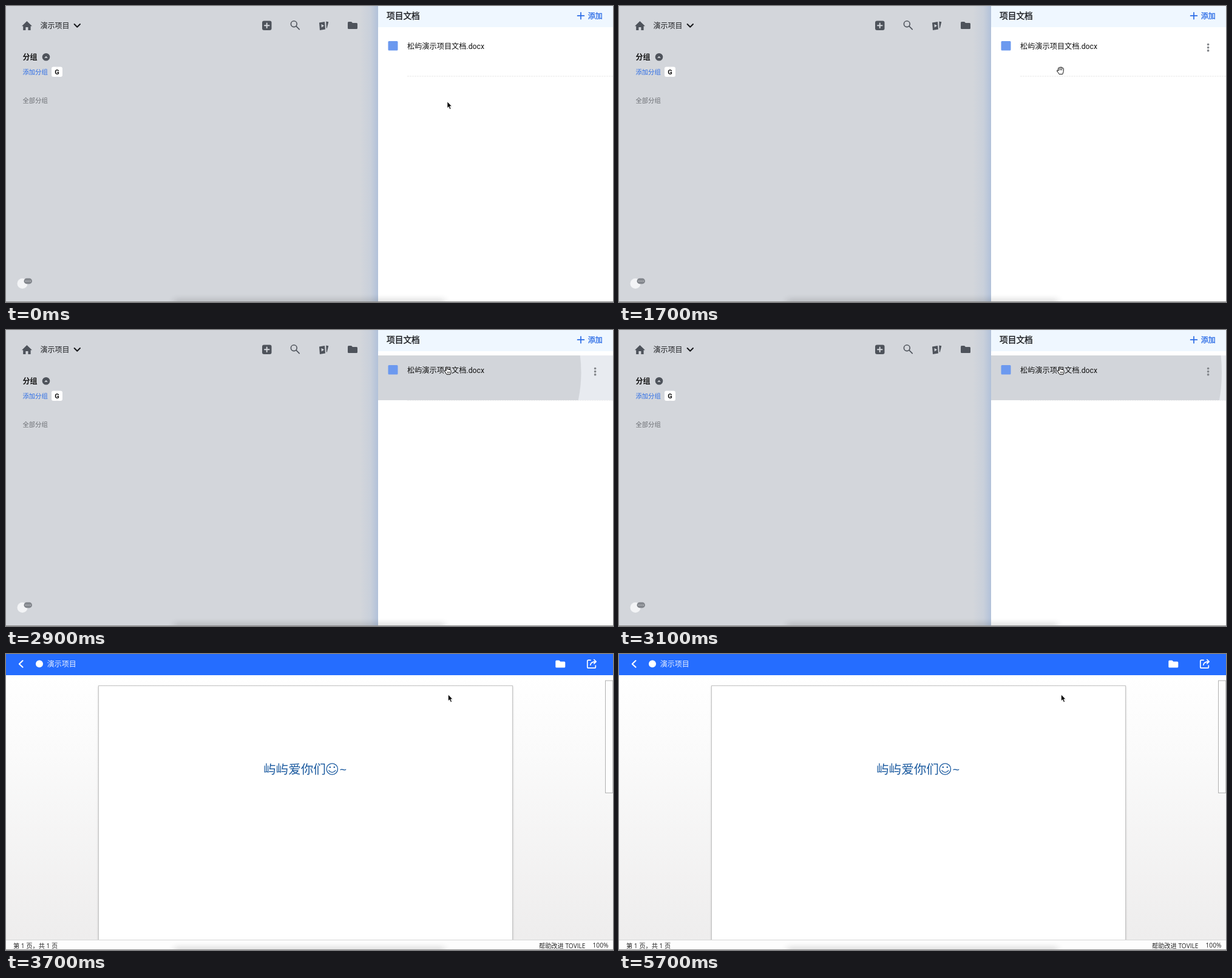
Recreate the animation shown at these times as an HTML page. Size 1000 px wide and 489 px high, loop 6.7 s.

```html
<!DOCTYPE html>
<html lang="zh-CN">
<head>
<meta charset="utf-8">
<title>项目文档</title>
<style>
html, body { margin: 0; height: 100%; overflow: hidden; background: #fff; }
svg { display: block; width: 100vw; height: 100vh; }
text { font-family: Roboto, "Noto Sans CJK SC", "Noto Sans CJK", sans-serif; font-size: 12px; }
.doc text { font-family: "Open Sans", "Noto Sans CJK SC", "Noto Sans CJK", sans-serif; }
.medium { stroke-width: .35; }
.small { font-size: 10.3px; }
.doc .status { font-size: 10.2px; }
.line { fill: none; stroke-linecap: round; stroke-linejoin: round; }
</style>
</head>
<body>
<svg viewBox="0 0 1000 489">
  <defs>
    <linearGradient id="edge">
      <stop offset="0" stop-color="#a9bcd9" stop-opacity="0"/>
      <stop offset=".6" stop-color="#a9bcd9" stop-opacity=".25"/>
      <stop offset="1" stop-color="#a9bcd9" stop-opacity=".8"/>
    </linearGradient>
    <linearGradient id="desk" x2="0" y2="1">
      <stop offset="0" stop-color="#fff"/>
      <stop offset=".3" stop-color="#fafafa"/>
      <stop offset="1" stop-color="#eeeded"/>
    </linearGradient>
    <filter id="blur" x="-10%" y="-200%" width="120%" height="500%"><feGaussianBlur stdDeviation="6 4"/></filter>
    <filter id="soft" x="-5%" y="-5%" width="110%" height="110%"><feGaussianBlur stdDeviation="1.5"/></filter>
    <clipPath id="row"><rect x="613" y="42" width="387" height="74"/></clipPath>
    <path id="folder" d="M0 2 Q0 0 1.5 0 H6 L8 2 H14.5 Q16 2 16 3.5 V10.5 Q16 12 14.5 12 H1.5 Q0 12 0 10.5 Z"/>
  </defs>

  <g id="project">
    <rect width="613" height="489" fill="#d3d6db"/>
    <rect x="583" width="30" height="489" fill="url(#edge)"/>

    <g fill="#4e535b">
      <path d="M26 33.2 L34.4 25 L43 33.2 H40.6 V40 H36.4 V35 H32.4 V40 H28.2 V33.2 Z"/>
      <rect x="422" y="24.5" width="15.5" height="15.5" rx="3"/>
      <path d="M516 27.5 L525 26 L526 38.5 L517 40 Z M527.3 25.5 L531.3 26.2 L528.8 36.5 L527.8 36.5 Z"/>
      <use href="#folder" x="563" y="26"/>
      <circle cx="66" cy="84.3" r="6.3"/>
    </g>
    <path d="M519.5 30 L524 32.6 L519.8 35.5 Z M63.2 85.8 L66 82.8 L68.8 85.8 Z" fill="#d3d6db"/>
    <path class="line" d="M429.7 28.5 V36 M426 32.2 H433.5" stroke="#d3d6db" stroke-width="2"/>
    <g class="line" stroke="#4e535b" stroke-width="1.6">
      <circle cx="474.3" cy="29.7" r="4.9"/>
      <path d="M478 33.4 L483.2 38.6"/>
    </g>
    <path class="line" d="M112.6 30 L117.3 34.7 L122 30" stroke="#17191c" stroke-width="2"/>

    <text x="56.5" y="37" fill="#1c1e21">演示项目</text>
    <text x="27.5" y="88.7" fill="#111" font-weight="700">分组</text>
    <text class="small" x="27.5" y="112.8" fill="#2b6ce6">添加分组</text>
    <rect x="75" y="100.5" width="18" height="16.5" rx="3" fill="#fff"/>
    <text x="84" y="112.7" fill="#111" font-weight="700" style="font-size:11px" text-anchor="middle">G</text>
    <text class="small" x="27.5" y="159.6" fill="#6b6e73">全部分组</text>

    <circle cx="27" cy="458.5" r="8.5" fill="#f3f4f6"/>
    <rect x="29.5" y="449.8" width="13.5" height="9.4" rx="4.7" fill="#84888e"/>
    <path class="line" d="M33 454.5 h0 M36.3 454.5 h0 M39.6 454.5 h0" stroke="#e8e9eb" stroke-width="1.6"/>

    <rect x="613" width="387" height="489" fill="#fff"/>
    <rect x="613" width="387" height="35" fill="#eff7ff"/>
    <text class="medium" x="627" y="21.2" fill="#17191c" stroke="#17191c" style="font-size:13.7px">项目文档</text>
    <path class="line" d="M947 10.8 V21.6 M941.6 16.2 H952.4" stroke="#2b6ce6" stroke-width="1.7"/>
    <text class="medium" x="958.7" y="20.7" fill="#2b6ce6" stroke="#2b6ce6">添加</text>

    <path d="M661 116 H1000" stroke="#e8e8e8" stroke-dasharray="3 1"/>
    <rect id="hover" x="613" y="42" width="387" height="74" fill="#e8ebf0"/>
    <g clip-path="url(#row)"><circle id="ripple" cx="727" cy="70" fill="#d2d5da"/></g>
    <rect x="629.5" y="58" width="16" height="15.5" rx="1.5" fill="#6c99ef"/>
    <text x="661" y="70.5" fill="#111" style="font-size:12.2px">松屿演示项目文档.docx</text>
    <path id="menu" class="line" d="M970.6 63.5 h0 M970.6 68.6 h0 M970.6 73.7 h0" stroke="#85888c" stroke-width="3.7"/>
  </g>

  <g id="paper" class="doc">
    <rect y="35" width="1000" height="437" fill="url(#desk)"/>
    <rect x="152" y="53" width="683" height="440" fill="#000" opacity=".22" filter="url(#soft)"/>
    <rect x="152.5" y="52.5" width="682" height="440" fill="#fff" stroke="#c4c4c4"/>
    <rect x="987.5" y="44" width="12.2" height="185.5" fill="#fdfdfd" stroke="#b0b0b0"/>

    <rect width="1000" height="35" fill="#256dff"/>
    <path class="line" d="M27.5 11 L21.8 16.4 L27.5 21.8" stroke="#fff" stroke-width="2.1"/>
    <circle cx="55" cy="16.3" r="6" fill="#fff"/>
    <text x="67.8" y="20.6" fill="#eaf1ff">演示项目</text>
    <use href="#folder" x="905.3" y="10.5" fill="#fff"/>
    <g class="line" stroke="#fff" stroke-width="1.7">
      <path d="M963 10.2 H959.5 Q957.8 10.2 957.8 12 V21.5 Q957.8 23.2 959.5 23.2 H969.6 Q971.3 23.2 971.3 21.5 V19"/>
      <path d="M962.8 18.2 Q963.2 13 971.5 12.6 M968.8 9.4 L972.2 12.6 L968.8 15.8"/>
    </g>

    <g fill="#1b5a9f">
      <text x="424" y="198" style="font-size:20.6px">屿屿爱你们</text>
      <text x="549.5" y="198" style="font-size:20.6px">~</text>
      <circle cx="533.8" cy="187" r="1.3"/>
      <circle cx="540.8" cy="187" r="1.3"/>
    </g>
    <g class="line" stroke="#1b5a9f" stroke-width="1.3">
      <circle cx="537.3" cy="190" r="9.2"/>
      <path d="M531.8 192.3 Q537.3 199 542.8 192.3"/>
    </g>

    <rect y="472" width="1000" height="17" fill="#fdfdfd"/>
    <path d="M0 472.5 H1000" stroke="#d6d6d6"/>
    <g fill="#222">
      <text class="status" x="12" y="486.3">第 1 页，共 1 页</text>
      <text class="status" x="878" y="486.3">帮助改进 TOVILE</text>
      <text class="status" x="966.5" y="485.3">100%</text>
    </g>
  </g>

  <rect x="277" y="483" width="446" height="16" fill="#000" opacity=".11" filter="url(#blur)"/>
  <path d="M0 488.5 H1000" stroke="#8c8c8c"/>

  <path id="arrow" d="M0 0 V10.6 L2.4 8.4 L4.1 12.5 L6 11.7 L4.3 7.7 H7.4 Z" fill="#000" stroke="#fff" stroke-width=".7"/>
  <g id="palm" class="line" stroke="#111">
    <path d="M-5.7 1 Q-6.3 -1.2 -4.4 -.9 L-3.4 .3 L-4 -3.6 Q-3.5 -5.4 -2.1 -4.4 Q-1.6 -6.6 .2 -5.4 Q2 -6.6 2.6 -4.5 Q4.7 -5 4.9 -2.8 Q5.2 2 3.3 6 H-2.4 Q-3.2 4 -5.7 1 Z" fill="#fff"/>
    <path d="M-2 -4 L-1.4 -.8 M.3 -5 V-1 M2.5 -4.2 L2 -.8" stroke-width=".8"/>
  </g>
  <g id="finger" class="line" stroke="#111">
    <path d="M-5 1 Q-5.4 -1 -3.5 -.4 L-2.4 .6 V-5.4 Q-1.4 -7.2 -.3 -5.4 V-2 Q1.2 -3 2 -1.5 Q3.4 -2.3 4 -.9 Q5.6 -1 5.7 .6 Q5.8 3.8 4.4 6.5 H-1.5 Q-2.6 4.2 -5 1 Z" fill="#fff"/>
    <path d="M0 2 V4.5 M1.7 2 V4.5 M3.4 2 V4.5" stroke-width=".7"/>
  </g>
</svg>
<script>
const LOOP = 6700, STEP = 100;
const el = id => document.getElementById(id);
const part = (t, from, to) => Math.min(1, Math.max(0, (t - from) / (to - from)));
const smooth = p => p * p * (3 - 2 * p);
const show = (id, on) => el(id).style.display = on ? "" : "none";

function place(id, on, x, y) {
  show(id, on);
  el(id).setAttribute("transform", `translate(${x} ${y})`);
}

function draw(t) {
  const opened = t >= 3200;
  const over = t >= 1700 && !opened;
  const y = 158 - 91 * smooth(part(t, 1419, 1937));
  const onName = y < 76;

  show("project", !opened);
  show("paper", t >= 3700);
  show("menu", over);
  el("hover").setAttribute("opacity", part(t, 1700, 1900));
  el("ripple").setAttribute("r", 268 * Math.sin(Math.PI / 2 * part(t, 2500, 3150)));

  place("arrow", !over, opened ? 728.5 : 727, y);
  place("palm", over && !onName, 727.5, y);
  place("finger", over && onName, 727.5, y);
}

function frame() {
  const t = performance.now() % LOOP;
  draw(Math.floor(t / STEP) * STEP);
  requestAnimationFrame(frame);
}
frame();
</script>
</body>
</html>
```
